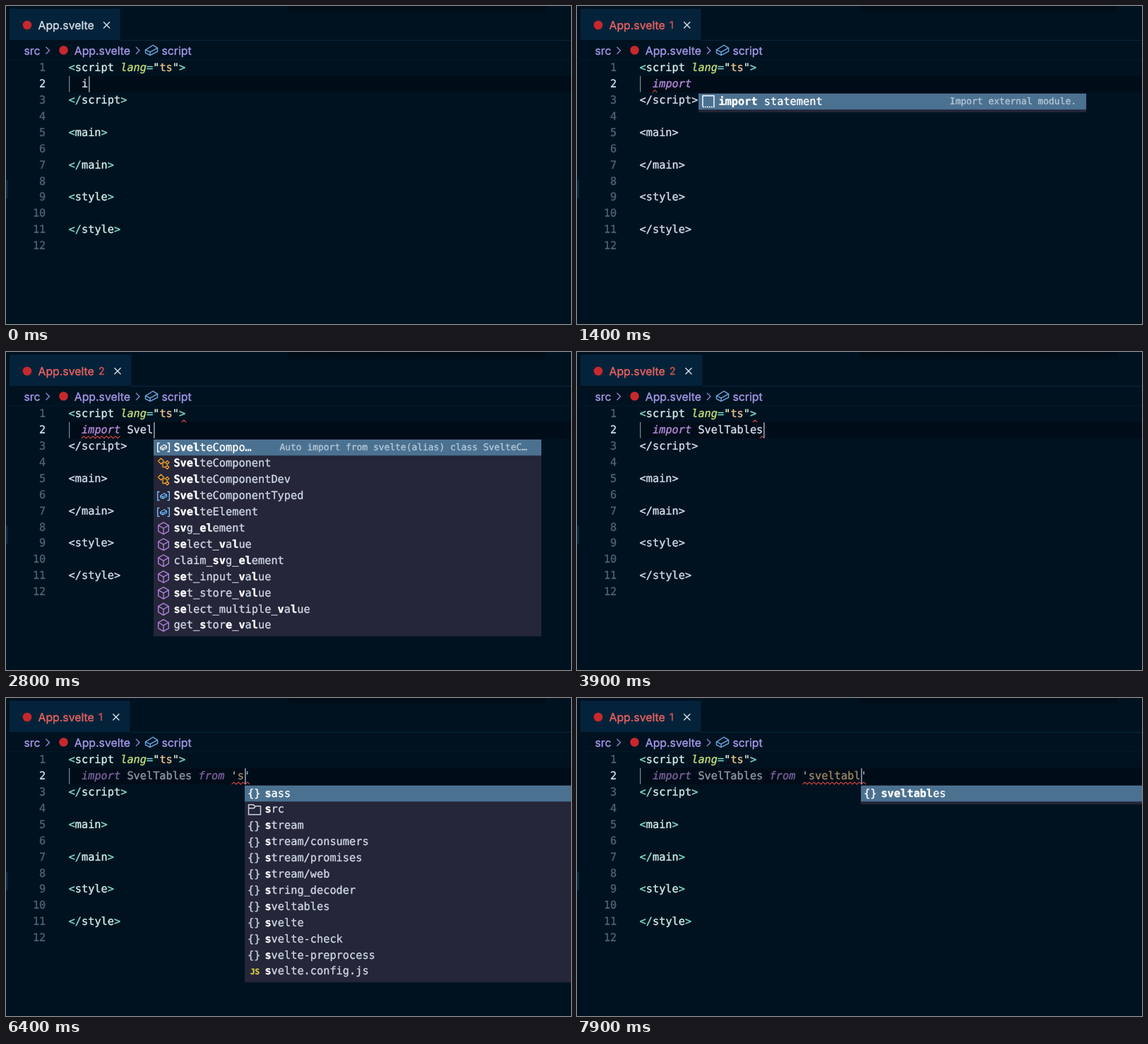
Animation of 800x450 px, one loop 8000 ms. Source, as an HTML page with a canvas:

```html
<!DOCTYPE html>
<html lang="en">
<head>
<meta charset="utf-8">
<title>Typing an import</title>
<style>
html, body { margin: 0; width: 100%; height: 100%; overflow: hidden; background: #001220; }
canvas { display: block; width: 800px; height: 450px; }
</style>
</head>
<body>
<canvas id="stage" width="800" height="450"></canvas>
<script>
const ctx = document.getElementById('stage').getContext('2d');
ctx.textRendering = 'geometricPrecision';
ctx.lineJoin = 'round';

const LOOP = 8000, LEFT = 88.6, CHAR = 9.2, ROW = 22.9;
const MONO = '15.28px "DejaVu Sans Mono", monospace';
const SMALL = '12.95px "DejaVu Sans Mono", monospace';
const UI = '15.8px Inter, sans-serif';
const C = {
  fg: '#d6deeb', teal: '#7fdbca', tag: '#d3efea', keyword: '#b98ade', attr: '#c5e478',
  str: '#ecc48d', quote: '#d9f5dd', red: '#d94a46', logo: '#c8282d', crumb: '#a599e9',
  num: '#4b6479', blue: '#75beff', purple: '#b180d7', orange: '#ee9d28', icon: '#c9d2de'
};

const LINE = "import SvelTables from 'sveltabl";
// Time at which each character of LINE appears
const KEYS = [
  0, 200, 300, 400, 500, 600, 800,
  1900, 2500, 2600, 2700, 3000, 3200, 3400, 3500, 3600, 3800,
  4900, 5000, 5100, 5200, 5300, 5600,
  5900, 6300, 6600, 6700, 6900, 7000, 7300, 7500, 7700
];

const parse = src => src.trim().split('\n').map(s => {
  const [kind, label, detail] = s.trim().split('|');
  return { kind, label, detail };
});

// Suggestion lists: first and last typed count, start of the query, entries
const LISTS = [
  { from: 1, to: 8, start: 0, items: parse(`
    snip|import statement|Import external module.
    snip|if
    snip|ifelse
    word|implements
    word|in
    word|instanceof
    word|interface
    cube|isFinite
    cube|isNaN
    vari|Image
    vari|Infinity
    vari|Int8Array`) },
  { from: 9, to: 12, start: 7, items: parse(`
    vari|SvelteCompo…|Auto import from svelte(alias) class SvelteC…
    class|SvelteComponent
    class|SvelteComponentDev
    vari|SvelteComponentTyped
    vari|SvelteElement
    cube|svg_element
    cube|select_value
    cube|claim_svg_element
    cube|set_input_value
    cube|set_store_value
    cube|select_multiple_value
    cube|get_store_value`) },
  { from: 19, to: 22, start: 18, items: parse(`
    snip|for|For Loop
    snip|forawaitof|For-Await-Of Loop
    snip|foreach =>|For-Each Loop using =>
    snip|forin|For-In Loop
    snip|forof|For-Of Loop
    iface|FullReloadPayload
    cube|fix_and_outro_and_destroy_block
    cube|fix_and_destroy_block
    cube|get_root_for_style
    cube|get_all_dirty_from_scope
    word|false
    word|finally`) },
  { from: 25, to: 32, start: 24, items: parse(`
    mod|sass
    dir|src
    mod|stream
    mod|stream/consumers
    mod|stream/promises
    mod|stream/web
    mod|string_decoder
    mod|sveltables
    mod|svelte
    mod|svelte-check
    mod|svelte-preprocess
    js|svelte.config.js`) }
];

// The hairline stroke gives the slightly heavier strokes of the editor font
function text(s, x, y, color, font = MONO) {
  ctx.font = font;
  ctx.fillStyle = ctx.strokeStyle = color;
  ctx.lineWidth = 0.35;
  ctx.fillText(s, x, y);
  ctx.strokeText(s, x, y);
}

function rect(x, y, w, h, color) {
  ctx.fillStyle = color;
  ctx.fillRect(x, y, w, h);
}

function path(points, color, width = 1.4, closed = false) {
  ctx.beginPath();
  for (let i = 0; i < points.length; i += 2) ctx.lineTo(points[i], points[i + 1]);
  if (closed) ctx.closePath();
  ctx.strokeStyle = color;
  ctx.lineWidth = width;
  ctx.stroke();
}

function dot(x, y, r, color) {
  ctx.beginPath();
  ctx.arc(x, y, r, 0, 7);
  ctx.fillStyle = color;
  ctx.fill();
}

const colX = col => LEFT + col * CHAR;
const baseY = line => 92.2 + (line - 1) * ROW;

// Draws [string, color, font] parts on one line of the code grid
function parts(list, line, col = 0) {
  for (const [s, color, font] of list) {
    text(s, colX(col), baseY(line), color, font);
    col += s.length;
  }
}

function cube(x, y, color) {
  const w = 7.3, h = 8.3, q = h / 2;
  path([x, y - h, x + w, y - q, x + w, y + q, x, y + h, x - w, y + q, x - w, y - q], color, 1.4, true);
  path([x - w, y - q, x, y, x + w, y - q], color);
  path([x, y, x, y + h], color);
}

// Flat box seen from above, used for fields and variables
function box(x, y, s, color, width) {
  const at = pts => pts.map((v, i) => (i % 2 ? y : x) + v * s);
  path(at([-4.5, -0.2, 1, -3.7, 4.5, -1.7, 4.5, 1, -1, 3.8, -4.5, 2]), color, width, true);
  path(at([-4.5, -0.2, -1, 1.4, 4.5, -1.7]), color, width);
  path(at([-1, 1.4, -1, 3.8]), color, width);
}

function diamond(x, y, r, color) {
  path([x, y - r, x + r, y, x, y + r, x - r, y], color, 1.4, true);
}

const ICONS = {
  snip(x, y, on) {
    const color = on ? '#fff' : C.icon;
    path([x - 8, y + 7, x - 8, y - 8, x + 8, y - 8, x + 8, y + 7], color);
    for (let i = -8; i < 8; i += 3) rect(x + i, y + 7, 1.8, 1.5, color);
  },
  cube: (x, y, on) => cube(x, y, on ? '#fff' : C.purple),
  vari(x, y, on) {
    const color = on ? '#fff' : C.blue;
    for (const s of [-1, 1])
      path([x + s * 5.5, y - 6, x + s * 8.3, y - 6, x + s * 8.3, y + 6, x + s * 5.5, y + 6], color);
    box(x, y, 1, color, 1.1);
  },
  class(x, y) {
    diamond(x - 3.5, y - 3.5, 4, C.orange);
    path([x, y - 1.5, x + 3, y - 1.5], C.orange);
    path([x - 1, y - 1, x - 1, y + 5, x + 3, y + 5], C.orange);
    diamond(x + 5.3, y - 1.5, 2.5, C.orange);
    diamond(x + 5.3, y + 5, 2.5, C.orange);
  },
  iface(x, y) {
    dot(x - 6, y, 2.5, C.blue);
    path([x - 5, y, x + 1, y], C.blue, 1.5);
    ctx.beginPath();
    ctx.arc(x + 4.5, y, 3.5, 0, 7);
    ctx.stroke();
  },
  mod: (x, y, on) => text('{}', x - 10, y + 4.8, on ? '#fff' : C.icon),
  dir(x, y) {
    path([x - 8.5, y + 7, x - 8.5, y - 7, x - 2, y - 7, x, y - 5, x + 8.5, y - 5, x + 8.5, y + 7], C.icon, 1.5, true);
    path([x - 8.5, y - 2, x - 1, y - 2, x + 1, y - 4], C.icon, 1.5);
  },
  js: (x, y) => text('JS', x - 6, y + 4, '#d8c93f', 'bold 11px "DejaVu Sans Mono", monospace'),
  word(x, y) {
    path([x - 7, y - 6, x + 7, y - 6, x + 7, y + 6, x - 7, y + 6], C.icon, 1.4, true);
    path([x - 4, y - 2, x + 4, y - 2], C.icon);
    path([x - 4, y + 2, x + 2, y + 2], C.icon);
  }
};

function subsequence(label, query) {
  const low = label.toLowerCase(), hits = new Set();
  let at = -1;
  for (const ch of query) {
    at = low.indexOf(ch, at + 1);
    if (at < 0) return null;
    hits.add(at);
  }
  return hits;
}

// Letters in order, or with one neighbouring pair swapped
function match(label, query) {
  const q = query.trim().toLowerCase();
  let hits = subsequence(label, q);
  for (let i = 1; !hits && i < q.length - 1; i++)
    hits = subsequence(label, q.slice(0, i) + q[i + 1] + q[i] + q.slice(i + 2));
  return hits;
}

function popup(n, cursor) {
  const list = LISTS.find(l => n >= l.from && n <= l.to);
  if (!list) return;
  const query = LINE.slice(list.start, n);
  const rows = list.items
    .map(item => ({ ...item, hits: match(item.label, query) }))
    .filter(item => item.hits);
  if (!rows.length) return;

  const x = Math.round(colX(cursor) + 0.7), top = 123.5, w = 549;
  rect(x, top, w, rows.length * ROW + 4, '#252639');
  rect(x, 124, w, 22.5, '#4b7191');
  rows.forEach(({ kind, label, detail, hits }, i) => {
    const y = top + i * ROW, on = i === 0;
    ICONS[kind](x + 14, y + 11.5, on);
    for (let k = 0; k < label.length; k++) {
      const hit = hits.has(k);
      text(label[k], x + 28.4 + k * CHAR, y + 16, hit || on ? '#fff' : '#ced7e3', (hit ? 'bold ' : '') + MONO);
    }
    if (detail) {
      ctx.font = SMALL;
      const gap = rows.length === 12 ? 20 : 14;
      text(detail, x + w - gap - ctx.measureText(detail).width, y + 15, on ? '#b4c8d8' : '#8c97a9', SMALL);
    }
  });
}

function squiggle(from, to, line) {
  const pts = [], y = baseY(line) + 5.6;
  let up = true;
  for (let x = colX(from); x < colX(to); x += 3.2, up = !up) pts.push(x, y + (up ? 1.5 : -1.5));
  path(pts, C.red, 1.15);
}

function chevron(x, y) {
  path([x, y - 5, x + 5, y, x, y + 5], '#8f86cc', 1.4);
}

function topShade() {
  const g = ctx.createLinearGradient(0, 0, 0, 14);
  g.addColorStop(0, 'rgba(0,0,0,0.35)');
  g.addColorStop(1, 'rgba(0,0,0,0)');
  rect(400, 0, 365, 14, g);
}

function chrome(badge) {
  const right = [161.5, 175.5, 177.5][badge], close = [142.5, 155.8, 158][badge];
  rect(0, 0, 800, 450, '#001220');
  topShade();
  rect(0, 246, 3, 26, '#04263e');
  rect(5, 4, right - 5, 44, '#04233a');
  rect(right, 48, 800 - right, 1, '#08283e');
  rect(5, 75.5, 795, 1, '#041c2d');

  dot(30, 27, 6.3, C.logo);
  text('App.svelte', 45.5, 32.7, badge ? '#ee6360' : '#d5dfe8', UI);
  if (badge) text(badge, 131, 32, '#d9534f', '14.3px Inter, sans-serif');
  path([close - 4.5, 22.5, close + 4.5, 31.5], '#d5dfe8', 1.4);
  path([close + 4.5, 22.5, close - 4.5, 31.5], '#d5dfe8', 1.4);

  text('src', 25.5, 68.7, C.crumb, UI);
  chevron(56.5, 63);
  dot(81.5, 62.5, 6.3, C.logo);
  text('App.svelte', 96.8, 68.7, C.crumb, UI);
  chevron(184, 63);
  box(206, 62.5, 1.9, '#6aa9e4', 1.4);
  text('script', 220.5, 68.7, C.crumb, UI);
}

function page(broken) {
  rect(88, 98.5, 712, 24, '#000d18');
  rect(89, 99, 1.3, ROW, '#74838f');
  for (let i = 1; i <= 12; i++) {
    const s = String(i);
    text(s, 56.3 - s.length * CHAR, baseY(i), i === 2 ? '#c5e4fd' : C.num);
  }
  parts([
    ['<', C.teal], ['script', C.tag], [' lang', C.attr, 'italic ' + MONO], ['=', C.teal],
    ['"', C.quote], ['ts', C.str], ['"', C.quote], ['>', C.teal]
  ], 1);
  const edge = broken ? C.fg : C.teal, name = broken ? C.fg : C.tag;
  const tags = { 3: '/script', 5: 'main', 7: '/main', 9: 'style', 11: '/style' };
  for (const line in tags) {
    const [, slash, word] = tags[line].match(/(\/?)(.*)/);
    parts([['<' + slash, edge], [word, name], ['>', edge]], +line);
  }
}

function typed(n, valid) {
  const s = LINE.slice(0, n), italic = 'italic ' + MONO;
  const word = (a, b) => n >= b
    ? [s.slice(a, b), C.keyword, italic]
    : [s.slice(a, b), C.fg];
  ctx.globalAlpha = valid ? 0.62 : 1;
  parts([word(0, 6), [s.slice(6, 18), C.fg], word(18, 22), [s.slice(22, 23), C.fg]], 2, 2);
  if (n > 23) parts([["'", C.quote], [s.slice(24), C.str], ["'", C.quote]], 2, 25);
  ctx.globalAlpha = 1;
}

function marks(t, cursor) {
  if (t >= 5900) return squiggle(25.1, cursor + 1, 2);
  if (t >= 2000) squiggle(17.4, 18.4, 1);
  if (t >= 3900) squiggle(cursor - 0.5, cursor + 0.5, 2);
  else if (t >= 2000 && t < 3300) squiggle(2, 8, 2);
  else if (t >= 900 && t < 2000) squiggle(2, 3, 2);
}

function caretAlpha(t) {
  if (t >= 1400 && t < 1600 || t >= 4400 && t < 4600) return 0;
  return t >= 1300 && t < 1400 ? 0.5 : 1;
}

function draw(t) {
  const n = KEYS.filter(k => k <= t).length;
  const cursor = n + 2, valid = t >= 5900;
  const badge = t < 700 ? 0 : t < 2000 || t >= 6300 ? 1 : 2;
  chrome(badge);
  page(t >= 1000 && !valid);
  typed(n, valid);
  marks(t, cursor);
  ctx.globalAlpha = caretAlpha(t);
  rect(Math.round(colX(cursor) + 0.5), 99.5, 1.7, 22.5, '#7f99ae');
  ctx.globalAlpha = 1;
  if (t >= 100) popup(n, cursor);
}

function tick() {
  draw(performance.now() % LOOP);
  requestAnimationFrame(tick);
}
tick();
</script>
</body>
</html>
```
